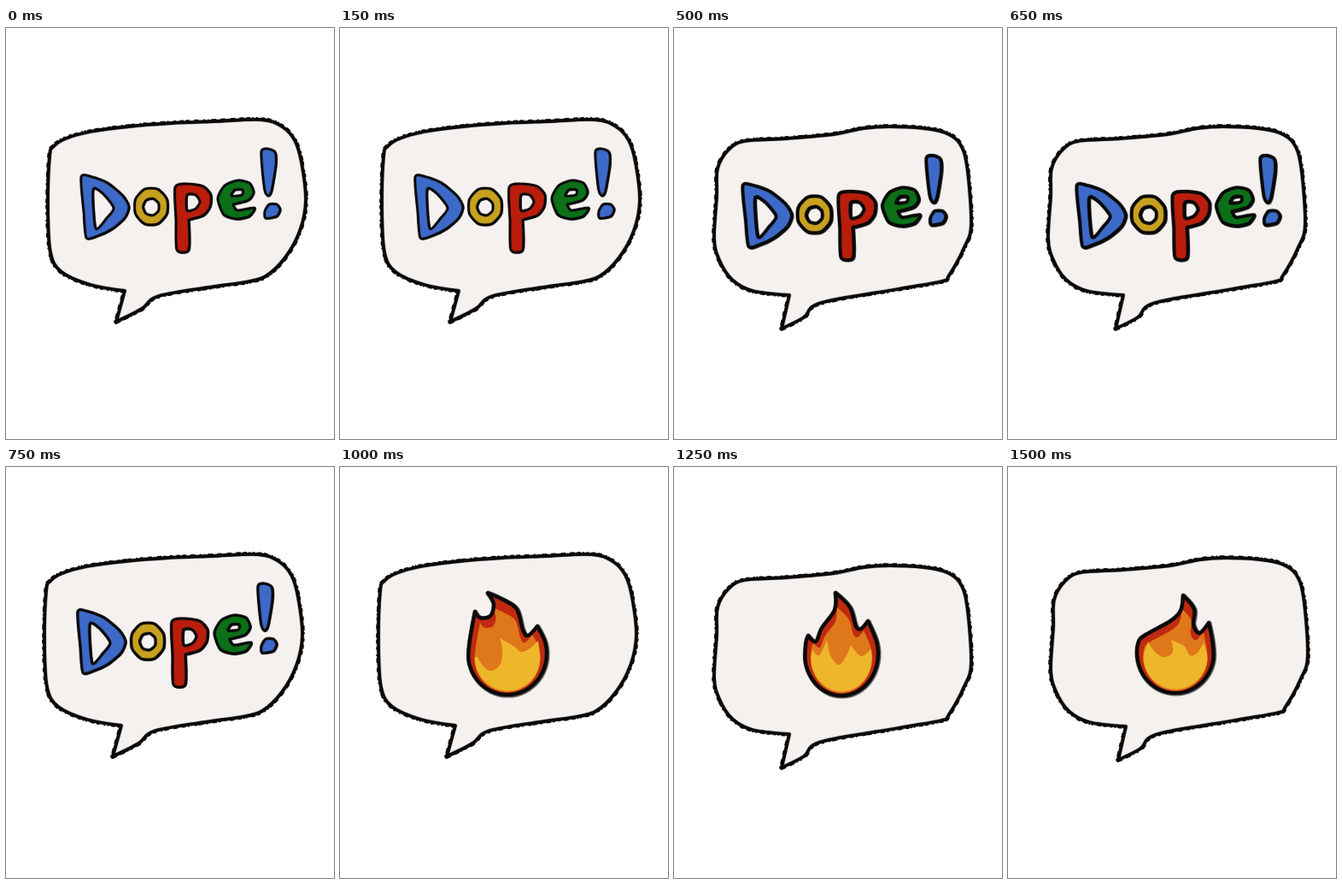
An HTML page with a canvas that plays this animation: 384x480 px, repeating every 1750 ms.

```html
<!DOCTYPE html>
<html lang="en">
<head>
<meta charset="utf-8">
<title>Dope!</title>
<style>
html, body { margin: 0; width: 100%; height: 100%; overflow: hidden; background: #fff; }
canvas { display: block; width: 384px; height: 480px; }
</style>
</head>
<body>
<canvas id="stage" role="img" aria-label="Speech bubble: Dope!"></canvas>
<script>
const W = 384, H = 480, HOLD = 250;
const INK = '#09090a', PAPER = '#f4f1ef';
const BLUE = '#3d6ac8', GOLD = '#c8a01f', RED = '#ba1d0c', GREEN = '#0b7017';
const EMBER = '#c02a10', ORANGE = '#de781a', YELLOW = '#eeb62b';

const canvas = document.getElementById('stage');
const ctx = canvas.getContext('2d');
const dpr = window.devicePixelRatio || 1;
canvas.width = W * dpr;
canvas.height = H * dpr;
ctx.scale(dpr, dpr);
ctx.lineJoin = 'round';

// Key points are written "x,y"; a trailing "!" makes a sharp corner.
const points = text => text.trim().split(/\s+/).map(s => {
  const [x, y] = s.split(',').map(parseFloat);
  return { x, y, sharp: s.endsWith('!') };
});

// Closed smooth rings through key points.
function curve(bend, ...rings) {
  const path = new Path2D();
  for (const pts of rings) {
    const n = pts.length, at = i => pts[(i + n) % n];
    const pull = i => at(i).sharp ? [0, 0] :
      [(at(i + 1).x - at(i - 1).x) * bend, (at(i + 1).y - at(i - 1).y) * bend];
    path.moveTo(pts[0].x, pts[0].y);
    pts.forEach((p, i) => {
      const q = at(i + 1), a = pull(i), b = pull(i + 1);
      path.bezierCurveTo(p.x + a[0], p.y + a[1], q.x - b[0], q.y - b[1], q.x, q.y);
    });
    path.closePath();
  }
  return path;
}

const bubble = text => curve(1 / 6, points(text));
const glyph = (color, ...rings) => ({ color, path: curve(0.12, ...rings.map(points)) });

// Regular ring, for the round letter.
const ring = (cx, cy, rx, ry, n) => Array.from({ length: n }, (_, i) => {
  const a = (i + 0.5) / n * Math.PI * 2;
  return `${cx + rx * Math.cos(a)},${cy + ry * Math.sin(a)}`;
}).join(' ');

const smooth = bubble(`129,343! 139,307! 99,300 65,285 52,262 49,210 51,150 56,138 70,129
  99,121 144,115 194,111 244,109 299,107 323,115 338,131 346,157 351,202 344,237 327,268
  304,290 279,297 244,302 179,313 159,328`);
const lumpy = bubble(`129,342! 138,303! 95,298 71,285 56,262 50,237 53,187 54,155 67,133
  86,123 135,120 190,115 225,108 255,106 295,108 320,113 337,125 346,152 351,220 343,247
  325,280 316,287 265,296 175,312 155,329`);

const word = [
  glyph(BLUE, '88,174 101,174 119,181 137,196 144,209 139,222 124,235 107,243 94,245 91,215',
    '102,189 113,193 126,210 118,222 105,234'),
  glyph(GOLD, ring(170, 208.5, 20, 22, 8), ring(170, 209, 9.5, 10, 7)),
  glyph(RED, '198,186 213,182 231,185 240,195 239,209 231,219 214,224! 214,259 200,259 199,225',
    '212,195 222,195 227,203 222,211 212,213'),
  glyph(GREEN, '248,199 256,184 271,178 285,181 290,192 284,201 266,206! 271,213 291,210 285,220 270,223 255,218',
    '264,196 268,189 277,189 276,195'),
  glyph(BLUE, '299,144 306,141 315,145 316,160 311,190 307,196 303,190 300,165'),
  glyph(BLUE, '303,214 308,206 317,206 321,212 317,220 304,222')
];

// Upper edge of each fire from left to right; the round bottom is an ellipse.
function bowl(cx, cy, rx, ry, dip) {
  const n = 9;
  return Array.from({ length: n }, (_, i) => {
    const a = -dip + (Math.PI + 2 * dip) * i / (n - 1);
    return { x: cx + rx * Math.cos(a), y: cy + ry * Math.sin(a) };
  });
}

function fire(cy, rx, ry, edge, glow) {
  const cx = 196;
  return {
    cx, cy,
    body: curve(1 / 6, [...bowl(cx, cy, rx, ry, 0.25), ...points(edge)]),
    core: curve(1 / 6, [...bowl(cx, cy + 5, rx * 0.83, ry * 0.8, 0), ...points(glow)])
  };
}

const split = fire(218, 46, 48,
  '158,169! 164,176 176,174 180,160 173,147! 191,155 207,166 214,190 220,197 231,186!',
  '161,222! 168,233 177,238 188,230 190,212 187,200! 203,209 212,216 222,212 232,203!');
const tall = fire(218, 43, 49,
  '157,197! 166,204 173,188 188,167 189,147! 206,164 213,186 219,189 227,180!',
  '162,213! 170,220 179,202! 183,220 193,231 202,220 207,208! 219,221 230,213!');
const swept = fire(217, 45, 47,
  '161,196 190,180 202,168 205,150! 218,166 217,184 224,194 235,182!',
  '164,204! 172,216 183,222 193,216 191,202! 206,209 213,220 222,217 229,205!');

// Where the bubble sits, and how the lettering shifts, spreads and tilts.
const poses = [
  { bubble: smooth, dx: 0, dy: 0, text: { dx: 0, dy: 0, grow: 1, tilt: 0, line: 2.7, smear: 0.4 } },
  { bubble: lumpy, dx: 0, dy: 0, text: { dx: -2, dy: 0, grow: 1.02, tilt: -0.02, line: 3.2, smear: 1.4 } },
  { bubble: lumpy, dx: -3, dy: 9, text: { dx: -5, dy: 9, grow: 1.02, tilt: -0.01, line: 3.6, smear: 0.8 } },
  { bubble: smooth, dx: -4, dy: -5, text: { dx: -4, dy: -5, grow: 1, tilt: 0, line: 3, smear: 0.4 } },
  { bubble: smooth, dx: -4, dy: -5, fire: split },
  { bubble: lumpy, dx: -3, dy: 9, fire: tall },
  { bubble: lumpy, dx: 0, dy: 0, fire: swept }
];

function seeded(seed) {
  return () => (seed = seed * 16807 % 2147483647) / 2147483647;
}
const rand = seeded(41);
const crumbs = Array.from({ length: 60 }, () => 1 + 5 * rand());

// Draws inside its own saved state, moved by (x, y).
function within(x, y, draw) {
  ctx.save();
  ctx.translate(x, y);
  draw();
  ctx.restore();
}

function ink(path, width, alpha = 1) {
  ctx.globalAlpha = alpha;
  ctx.strokeStyle = INK;
  ctx.lineWidth = width;
  ctx.stroke(path);
  ctx.globalAlpha = 1;
}

function fill(path, color) {
  ctx.fillStyle = color;
  ctx.fill(path, 'evenodd');
}

function drawBubble({ bubble, dx, dy }) {
  within(dx, dy, () => {
    // Uneven dashes leave a rough pencil edge outside the paper.
    ctx.setLineDash(crumbs);
    ink(bubble, 5.6);
    ctx.setLineDash([]);
    fill(bubble, PAPER);
    ink(bubble, 5, 0.25);
    ink(bubble, 3.8);
  });
}

function drawWord({ dx, dy, grow, tilt, line, smear }) {
  const midX = 200, midY = 202;
  within(midX + dx, midY + dy, () => {
    ctx.rotate(tilt);
    ctx.scale(grow, 1);
    ctx.translate(-midX, -midY);
    for (const { color, path } of word) {
      within(smear, smear, () => ink(path, line, 0.75));
      fill(path, color);
      ink(path, line + 1.2, 0.25);
      ink(path, line);
    }
  });
}

function drawFire({ cx, cy, body, core }) {
  within(0.6, 0.6, () => ink(body, 6, 0.6));
  fill(body, EMBER);
  // The orange layer is the body shrunk towards its foot.
  within(cx, cy + 30, () => {
    ctx.scale(0.84, 0.84);
    ctx.translate(-cx, -cy - 30);
    fill(body, ORANGE);
  });
  fill(core, YELLOW);
  ink(body, 5.2, 0.3);
  ink(body, 4);
}

let shown = -1;
function render(time) {
  const i = Math.floor(time / HOLD) % poses.length;
  if (i === shown) return;
  shown = i;
  const pose = poses[i];
  ctx.fillStyle = '#fff';
  ctx.fillRect(0, 0, W, H);
  drawBubble(pose);
  if (pose.text) drawWord(pose.text);
  else drawFire(pose.fire);
}

const start = performance.now();
function tick() {
  render(performance.now() - start);
  requestAnimationFrame(tick);
}
tick();
</script>
</body>
</html>
```
